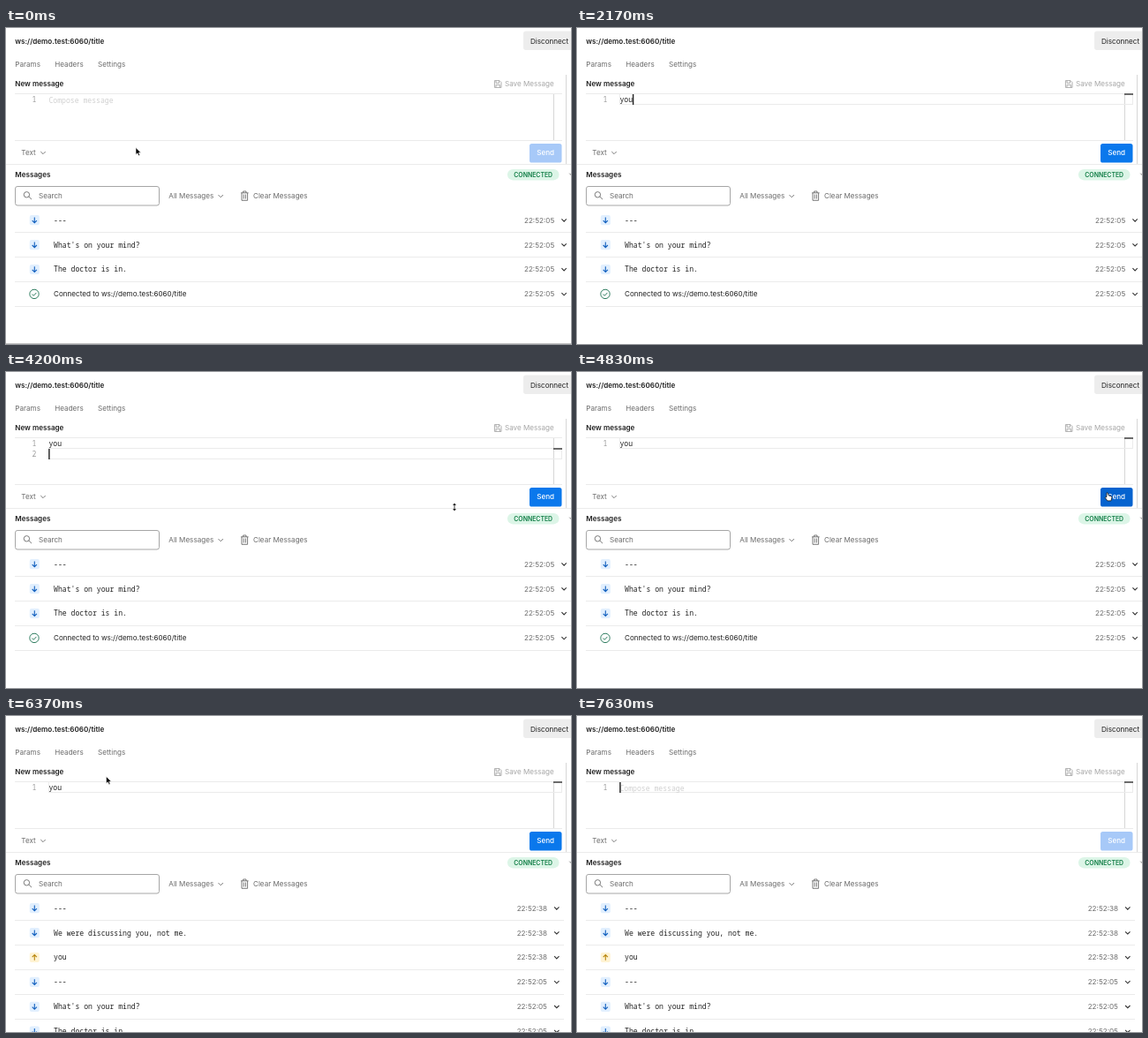
An HTML page that plays this animation: 640x358 px, repeating every 8 s.

```html
<!DOCTYPE html>
<html lang="en">
<head>
<meta charset="utf-8">
<title>WebSocket console</title>
<style>
  html, body { margin: 0; width: 100%; height: 100%; overflow: hidden; background: #fff; }
  svg { display: block; width: 640px; height: 358px; }
  text { font: 8.1px Inter, sans-serif; fill: #6b6b6b; white-space: pre; }
  .strong { font-weight: 600; fill: #212121; }
  .dark { fill: #212121; }
  .mono { font: 8.15px "Noto Sans Mono", monospace; fill: #212121; }
  .faint { fill: #a6a6a6; }
  .line { stroke: #ebebeb; fill: none; }
  .icon { stroke: #6b6b6b; fill: none; stroke-width: .9; }
  #send text { fill: #fff; font-weight: 500; }
</style>
</head>
<body>
<svg viewBox="0 0 640 358">
  <defs>
    <path id="chevron" d="M-2.7 -1.3L0 1.4L2.7 -1.3"/>
    <path id="down" d="M0 -3.2V3M-2.6 .4L0 3L2.6 .4"/>
  </defs>

  <text class="strong" x="10.3" y="17.6">ws://demo.test:6060/title</text>
  <rect x="586" y="3.5" width="60" height="21.5" rx="3" fill="#ededed"/>
  <text class="dark" x="594" y="17.6">Disconnect</text>
  <text x="10.3" y="44.4">Params</text>
  <text x="55.3" y="44.4">Headers</text>
  <text x="104" y="44.4">Settings</text>

  <text class="strong" x="10.3" y="66.4">New message</text>
  <path class="icon" style="stroke:#a6a6a6" d="M553.4 59.6H559L561 61.6V67.4H553.4ZM555 59.6V62.3H558.6V59.6M555 67.4V64.4H559.4V67.4"/>
  <text class="faint" x="565" y="66.4">Save Message</text>
  <path class="line" d="M10 74.5H630M10 127.5H630M0 154.5H640"/>
  <path class="line" style="stroke:#d6d6d6" d="M620.5 75V127M634.5 53V154"/>

  <rect id="highlight" class="line" x="48.5" width="581" height="12"/>
  <rect id="marker" x="620" width="10" height="1.6" fill="#4a4a4a"/>
  <text class="mono" style="fill:#999" x="29.5" y="83.5">1</text>
  <text id="second" class="mono" style="fill:#999" x="29.5" y="95.8">2</text>
  <text id="placeholder" class="mono" style="fill:#d0d0d0" x="48.4" y="84.5">Compose message</text>
  <text id="typed" class="mono" x="48.4" y="83.5"></text>
  <rect id="caret" width="1.4" height="12" fill="#212121"/>

  <text x="17.3" y="144.4">Text</text>
  <use class="icon" href="#chevron" x="42" y="141.3"/>
  <g id="send">
    <rect x="593" y="131" width="36.5" height="21.5" rx="2.6"/>
    <text x="611.2" y="144.4" text-anchor="middle">Send</text>
  </g>

  <text class="strong" x="10.3" y="168.9">Messages</text>
  <rect x="568" y="160" width="58.5" height="12.4" rx="6.2" fill="#dcf5e7"/>
  <text x="597.2" y="168.7" text-anchor="middle" style="font-size:6.9px;font-weight:600;fill:#0c7a42">CONNECTED</text>
  <use class="icon" href="#chevron" x="641" y="166"/>
  <rect x="10.5" y="179.5" width="163" height="21.5" rx="2.5" fill="none" stroke="#a6a6a6"/>
  <path class="icon" d="M25.8 191L29 194.2M26.6 188.8a3.2 3.2 0 1 1-6.4 0a3.2 3.2 0 1 1 6.4 0"/>
  <text x="37" y="193.3">Search</text>
  <text x="184.3" y="193.3">All Messages</text>
  <use class="icon" href="#chevron" x="243.2" y="190.4"/>
  <path class="icon" d="M266 186.8H274.6M268.6 186.8V185H272V186.8M267 187V195.3H273.6V187M269.2 188.5V193.5M271.4 188.5V193.5"/>
  <text x="280" y="193.3">Clear Messages</text>

  <g id="before"></g>
  <g id="after"></g>
  <path id="edge" d="M0 357.5H640" stroke="#c4c4c4"/>

  <g id="mouse">
    <path data-kind="arrow" d="M0 0V8L1.9 6.3L3.2 9.2L4.6 8.6L3.4 5.8H5.8Z" fill="#000" stroke="#fff" stroke-width=".6"/>
    <path data-kind="beam" d="M-2 -4.3Q0 -4.3 0 -3V3Q0 4.3 -2 4.3M2 -4.3Q0 -4.3 0 -3M0 3Q0 4.3 2 4.3M-1 .9H1" fill="none" stroke="#222" stroke-width=".9"/>
    <path data-kind="resize" d="M0 -4.6L2.2 -2H.6V2H2.2L0 4.6L-2.2 2H-.6V-2H-2.2Z" fill="#000" stroke="#fff" stroke-width=".4"/>
    <path data-kind="hand" d="M-2 -4.6Q-1 -5.2 -.5 -4.2L.1 -1.6L3 -.8Q4 -.4 3.8 .8L3 4.4H-1.2L-3.8 .8Q-3.6 -.4 -2.2 .4Z" fill="#fff" stroke="#111" stroke-width=".8"/>
  </g>
</svg>
<script>
const $ = id => document.getElementById(id);
const show = (el, on) => { el.style.display = on ? '' : 'none'; };

const oldRows = [
  ['down', '---', '05'],
  ['down', "What's on your mind?", '05'],
  ['down', 'The doctor is in.', '05'],
  ['check', 'Connected to ws://demo.test:6060/title', '05'],
];
const newRows = [
  ['down', '---', '38'],
  ['down', 'We were discussing you, not me.', '38'],
  ['up', 'you', '38'],
];

function badge(kind, y) {
  if (kind === 'check') {
    return `<g transform="translate(32 ${y})" fill="none" stroke="#2f7d60">
      <circle r="5.2"/><path d="M-2.3 .2L-.6 1.9L2.4 -1.5"/></g>`;
  }
  const [fill, stroke, turn] = kind === 'up' ? ['#fff3d3', '#b8860b', 180] : ['#e1effe', '#1260bf', 0];
  return `<g transform="translate(32.3 ${y})"><rect x="-5.5" y="-5.6" width="11" height="11.2" rx="2" fill="${fill}"/>
    <use href="#down" transform="rotate(${turn})" fill="none" stroke="${stroke}" stroke-width="1.1"/></g>`;
}

function rowList(rows, right) {
  return rows.map(([kind, label, seconds], i) => {
    const y = 217.7 + 27.9 * i, rule = Math.floor(y + 13.9) + .5;
    return `${badge(kind, y)}
      <text class="${kind === 'check' ? 'dark' : 'mono'}" x="54" y="${y + 2.9}">${label}</text>
      <text x="${right - 34.3}" y="${y + 2.9}">22:52:${seconds}</text>
      <use href="#chevron" x="${right + 10.8}" y="${y}" fill="none" stroke="#333" stroke-width="1.1"/>
      <path class="line" d="M10 ${rule}H${right + 19}"/>`;
  }).join('');
}
$('before').innerHTML = rowList(oldRows, 621.3);
$('after').innerHTML = rowList([...newRows, ...oldRows.slice(0, 3)], 613);

// Pointer path: time, x, y
const path = [
  [0, 147, 135.5], [280, 121, 85], [560, 121, 85], [910, 123.5, 89],
  [3500, 89, 35], [3570, 89, 35], [3640, 84, 28], [3710, 84, 28], [4060, 508, 153],
  [4200, 508, 153], [4550, 602, 141.5], [4830, 602, 141.5], [4970, 472, 126],
  [5810, 166, 96], [6160, 139, 81], [6230, 139, 81], [6370, 113.5, 68.5],
  [6510, 115, 67.5], [6580, 115, 67.5], [6930, 111, 77], [8000, 111, 77],
];

function pointer(t) {
  const i = path.findIndex(p => p[0] > t);
  const [t0, x0, y0] = path[i - 1], [t1, x1, y1] = path[i];
  const u = (t - t0) / (t1 - t0), k = u * u * (3 - 2 * u);
  return [x0 + (x1 - x0) * k, y0 + (y1 - y0) * k];
}

function pointerKind(x, y) {
  if (x > 593 && y > 131 && y < 152) return 'hand';
  if (y > 150 && y < 157) return 'resize';
  return y > 74 && y < 127 && x < 620 ? 'beam' : 'arrow';
}

const typedLength = t =>
  t < 1820 ? 0 : t < 1890 ? 1 : t < 2170 ? 2 : t < 7280 ? 3 : t < 7490 ? 2 : t < 7560 ? 1 : 0;

// Spans in which the caret is visible
const caretSpans = [[700, 1190], [1680, 3220], [3780, 4270], [4900, 5390], [5880, 6370], [6860, 8000]];
const within = (t, [from, to]) => t >= from && t < to;

function draw(now) {
  const loop = now % 8000, t = loop - loop % 70;
  const length = typedLength(t), twoLines = within(t, [2660, 4760]);
  const top = twoLines ? 87 : 75;

  $('typed').textContent = 'you'.slice(0, length);
  show($('placeholder'), !length);
  show($('second'), twoLines);
  show($('highlight'), t >= 1820);
  show($('marker'), t >= 1820);
  $('highlight').setAttribute('y', top - .5);
  $('marker').setAttribute('y', top - .8);
  show($('caret'), caretSpans.some(span => within(t, span)));
  $('caret').setAttribute('x', 48.2 + (twoLines ? 0 : length * 4.9));
  $('caret').setAttribute('y', top);

  show($('before'), t < 4900);
  show($('after'), t >= 4900);
  show($('edge'), t < 560);

  const [x, y] = pointer(t), kind = pointerKind(x, y);
  $('send').setAttribute('fill', !length ? '#a7c9f8' : kind === 'hand' && t > 4200 ? '#0563cf' : '#0a78ec');
  show($('mouse'), !within(t, [1820, 3570]) && t < 7280);
  $('mouse').setAttribute('transform', `translate(${x} ${y})`);
  for (const shape of $('mouse').children) show(shape, shape.dataset.kind === kind);
}

const start = performance.now();
(function tick() {
  draw(performance.now() - start);
  requestAnimationFrame(tick);
})();
</script>
</body>
</html>
```
